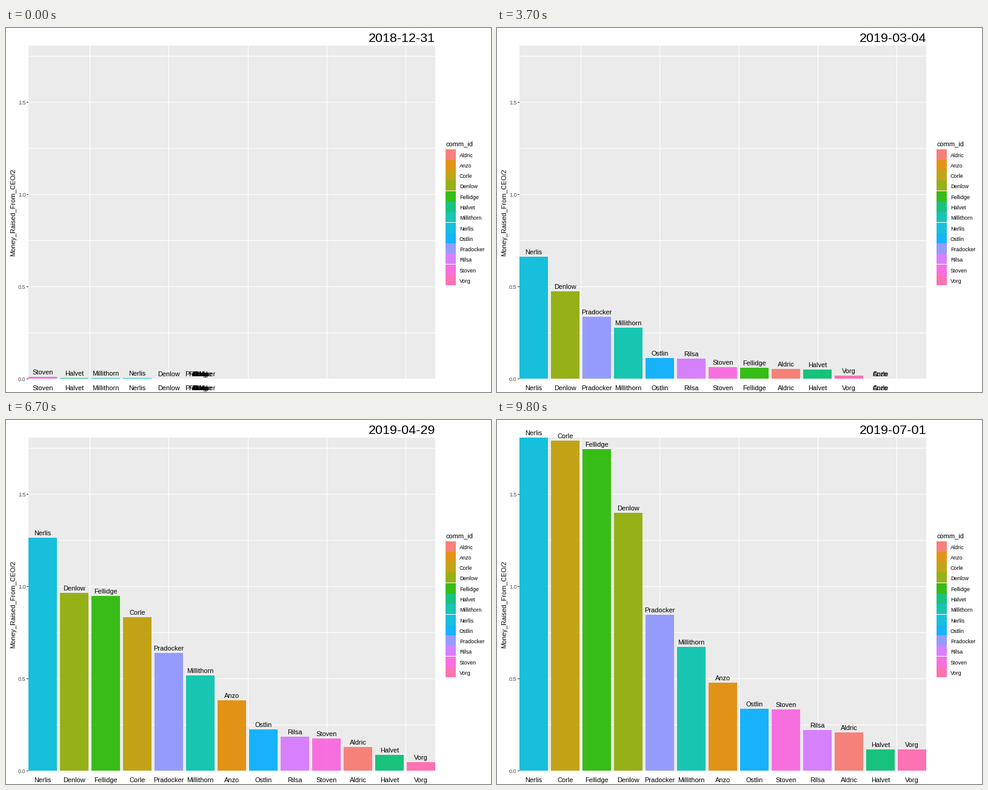
A matplotlib script that plays this animation: 800x600 px, repeating every 10000 ms.

```python
import numpy as np
import matplotlib.pyplot as plt
from matplotlib.animation import FuncAnimation
from matplotlib.patches import Rectangle

plt.rcParams["font.family"] = "Liberation Sans"

LEFT, RIGHT, TOP, BASE = 37, 708, 29, 578
UNIT = 304                       # pixels per 1.0 on the value axis
STEP = (RIGHT - LEFT) / 12.9     # pixels per rank

# Fundraising pace: a rush in the last week of each 13-week quarter, then a lull.
WEEKS = np.arange(27)
PACE = np.cumsum(np.select([WEEKS % 13 == 12, WEEKS % 13 == 0], [3, 0.1], 1.0))


def climb(a, b):
    """Share of the pace between weeks a and b, 0 to 1."""
    return np.clip((PACE - PACE[a]) / (PACE[b] - PACE[a]), 0, 1)


def growth(launch, q1, q2, head=0, bend=1, late=1, seed=0):
    """Weekly bar heights in pixels, from the totals of the two quarters.

    head is the share raised at launch, bend and late shape the two climbs,
    seed is what was there before the launch.
    """
    rise = head + (1 - head) * climb(launch, 13 if launch < 13 else 26) ** bend
    first = np.where(WEEKS > launch, q1 * rise, 0)
    return np.maximum(seed, first + (q2 - q1) * climb(13, 26) ** late)


SERIES = {
    "Aldric": growth(6, 29, 63, head=0.3),
    "Anzo": growth(9, 105, 145, head=0.3),
    "Corle": growth(15, 544, 544, head=0.19, bend=0.6),
    "Denlow": growth(3, 256, 425, head=0.05, late=1.2, seed=0.2),
    "Fellidge": growth(2, 109, 530, head=0.02, bend=3.45, late=0.68),
    "Halvet": growth(0, 22, 35, head=0.066, bend=0.9, seed=1.4),
    "Millithorn": growth(1, 138, 204, seed=1.3),
    "Nerlis": growth(2, 319, 549, head=0.12, seed=1.2),
    "Ostlin": growth(7, 49, 102, head=0.58, late=0.8),
    "Pradocker": growth(4, 169, 257, head=0.22),
    "Rilsa": growth(0, 51, 67),
    "Stoven": growth(0, 34, 101, head=0.09, bend=1.5, seed=3),
    "Vorg": growth(2, 9, 34.8, late=1.3),
}

heights = np.array(list(SERIES.values())).T
# Rank 0 is the tallest; equal values share the best rank.
ranks = (heights[:, None, :] > heights[:, :, None]).sum(axis=2)
dates = [str(np.datetime64("2018-12-31") + 7 * int(w)) for w in WEEKS]

# First frame of each transition
starts = [1, 6, 9, 14, *range(18, 83, 4), *range(85, 98, 3)]
slow = {1, 9, 14}


def hue(degrees, lum=65, chroma=100):
    """sRGB colour of a hue in polar CIE-LUV."""
    angle = np.radians(degrees)
    u = chroma * np.cos(angle) / (13 * lum) + 0.19784
    v = chroma * np.sin(angle) / (13 * lum) + 0.46834
    y = ((lum + 16) / 116) ** 3
    xyz = [9 * y * u / (4 * v), y, y * (12 - 3 * u - 20 * v) / (4 * v)]
    to_rgb = [[3.2405, -1.5371, -0.4985],
              [-0.9693, 1.8760, 0.0416],
              [0.0556, -0.2040, 1.0572]]
    rgb = np.clip(np.dot(to_rgb, xyz), 0, 1)
    return tuple(np.clip(np.where(rgb > 0.0031308,
                                  1.055 * rgb ** (1 / 2.4) - 0.055,
                                  12.92 * rgb), 0, 1))


colors = [hue(15 + 360 * i / len(SERIES)) for i in range(len(SERIES))]


def rank_x(rank):
    return LEFT + STEP * (0.45 + rank)


fig = plt.figure(figsize=(8, 6), dpi=100, facecolor="white")
ax = fig.add_axes([0, 0, 1, 1])
ax.set_xlim(0, 800)
ax.set_ylim(600, 0)
ax.axis("off")


def box(x, y, w, h, color, **kw):
    return ax.add_patch(Rectangle((x, y), w, h, fc=color, lw=0, **kw))


def label(x, y, s, px=11, ha="center", va="baseline", **kw):
    return ax.text(x, y, s, fontsize=px * 0.72, ha=ha, va=va, **kw)


# Panel, grid and value axis
box(LEFT, TOP, RIGHT - LEFT, BASE - TOP, "#EBEBEB")
for i in range(8):
    y = BASE - i * UNIT // 4
    if i:
        box(LEFT, y, RIGHT - LEFT, 1, "white")
    if i % 2 == 0:
        box(34, y, 3, 1, "#333333")
        label(32.5, y + 4, f"{i / 4:.1f}", 9, "right", color="#4D4D4D")
for i in range(1, 6):
    box(round(rank_x(2.5 * i - 1)), TOP, 1, BASE - TOP, "white")
label(12, 303.5, "Money_Raised_From_CEO/2", va="center", rotation=90)

# Legend
label(725, 194, "comm_id", ha="left")
for i, (name, color) in enumerate(zip(SERIES, colors)):
    y = int(200.1 + 17.28 * i)
    box(725, y, 17, 17, "#F2F2F2")
    box(725, y, 17, 17, color, alpha=0.9)
    label(748, y + 13, name, 9, "left")

# Moving parts
title = label(RIGHT, 23, "", 21.5, "right")
bars = [box(0, BASE, 47, 0, c, alpha=0.9, zorder=2) for c in colors]
tags = [label(0, 0, name, zorder=3) for name in SERIES]
names = [label(0, 597, name, zorder=3) for name in SERIES]


def progress(frame):
    """Week being left, week being entered and the share of the way."""
    k = int(np.searchsorted(starts, frame, side="right"))
    if k == 0:
        return 0, 0, 1.0
    begin = starts[k - 1]
    steps = 3 if begin in slow else 2
    return k - 1, k, min(1.0, (frame - begin + 1) / steps)


def draw(frame):
    a, b, t = progress(frame)
    hs = heights[a] + (heights[b] - heights[a]) * t
    xs = rank_x(ranks[a] + (ranks[b] - ranks[a]) * t)
    title.set_text(dates[b if t > 0.5 else a])
    for h, x, bar, tag, name in zip(hs, xs, bars, tags, names):
        left, right = round(x - 0.45 * STEP), round(x + 0.45 * STEP)
        tall = round(h)
        bar.set_bounds(left, BASE - tall, right - left, tall)
        tag.set_position((x, BASE - 4 - tall))
        name.set_x(x)
    return [title, *bars, *tags, *names]


anim = FuncAnimation(fig, draw, frames=100, interval=100, repeat=True)
plt.show()
```
